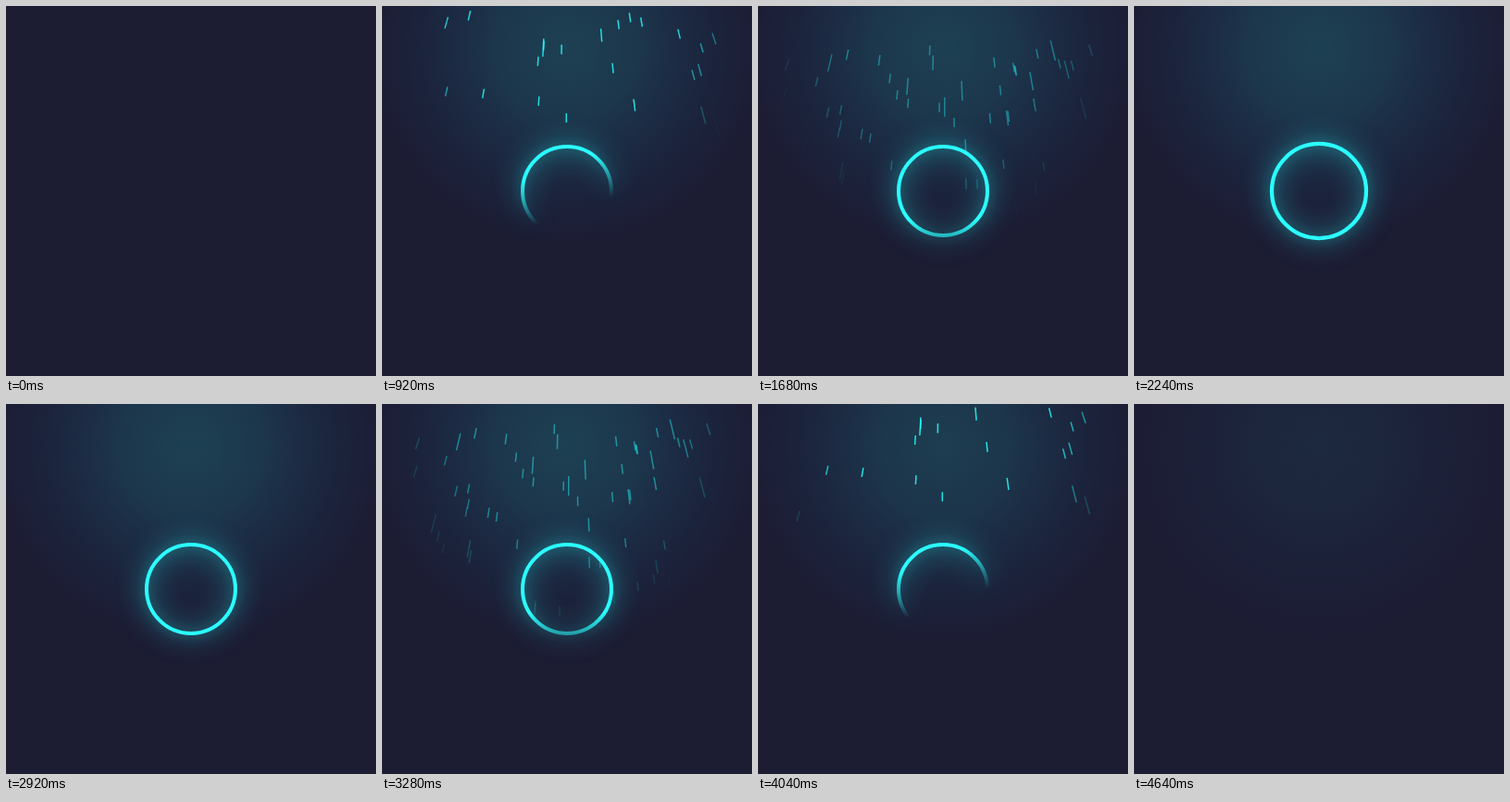
These frames come from a looping animation (400 px wide and 400 px high, 4800 ms). An HTML page with a canvas:

```html
<!DOCTYPE html>
<html>
<head>
<meta charset="utf-8">
<style>
html, body { margin: 0; width: 100%; height: 100%; overflow: hidden; background: #1c1c33; }
canvas { display: block; width: 100vmin; height: 100vmin; }
</style>
</head>
<body>
<canvas id="stage" width="400" height="400"></canvas>
<script>
const ctx = document.getElementById('stage').getContext('2d');
const LOOP = 4800, STEP = 40, TURN = 2440, START = 240;
const FALL = 0.26;        // px per ms
const APEX = -450;        // height where all rain lines meet
const DROPS = 78;

const clamp = v => Math.max(0, Math.min(1, v));
const ramp = (v, a, b) => clamp((v - a) / (b - a));
const cyan = alpha => `rgba(43,255,255,${alpha})`;

let seed = 7;
function random() {
  seed = (seed * 16807) % 2147483647;
  return seed / 2147483647;
}
for (let i = 0; i < 10; i++) random();

// Launches grow denser with time
const rain = Array.from({ length: DROPS }, () => ({
  lean: (random() - 0.5) * 0.66,
  launch: 300 + 1200 * random() ** 0.6,
  half: 5 + 7 * random() ** 4
}));

function drawGlow(level) {
  const g = ctx.createRadialGradient(200, 45, 0, 200, 45, 215);
  g.addColorStop(0, 'rgba(34,200,200,.21)');
  g.addColorStop(0.35, 'rgba(30,175,190,.185)');
  g.addColorStop(0.7, 'rgba(22,130,170,.09)');
  g.addColorStop(1, 'rgba(20,110,160,0)');
  ctx.globalAlpha = level;
  ctx.fillStyle = g;
  ctx.fillRect(0, 0, 400, 400);
}

function drawRain(u) {
  const level = 0.92 * Math.sqrt(1 - ramp(u, 700, 1900));
  ctx.strokeStyle = '#2ff';
  ctx.lineWidth = 1.5;
  for (const { lean, launch, half } of rain) {
    if (u < launch) continue;
    const y = FALL * (u - launch);
    const xAt = h => 200 + lean * (h - APEX);
    const far = Math.hypot((xAt(y) - 200) / 150, y / 190);
    ctx.globalAlpha = level * clamp((1.3 - far) * 2);
    ctx.beginPath();
    ctx.moveTo(xAt(y - half), y - half);
    ctx.lineTo(xAt(y + half), y + half);
    ctx.stroke();
  }
}

// A soft edge sweeps down the ring, tilted at first, then level
function drawRing(u) {
  const tilt = 0.35 * (1 - ramp(u, 920, 1280));
  const end = -50 + 150 * ramp(u, 280, 1960) ** 0.75;
  const begin = end - 50;
  const nx = Math.sin(tilt), ny = Math.cos(tilt);
  const g = ctx.createLinearGradient(nx * begin, ny * begin, nx * end, ny * end);
  g.addColorStop(0, cyan(1));
  g.addColorStop(1, cyan(0));
  const scale = 1 + 0.05 * (1 - Math.cos(Math.PI * ramp(u, 1960, TURN)));
  ctx.save();
  ctx.globalAlpha = 1;
  ctx.translate(200, 200);
  ctx.scale(scale, scale);
  ctx.filter = `drop-shadow(0 0 6px ${cyan(0.3)}) drop-shadow(0 0 14px ${cyan(0.8)})`;
  ctx.strokeStyle = g;
  ctx.lineWidth = 4;
  ctx.beginPath();
  ctx.arc(0, 0, 48, 0, Math.PI * 2);
  ctx.stroke();
  ctx.restore();
}

function draw(now) {
  const t = Math.floor((now % LOOP) / STEP) * STEP;
  ctx.globalAlpha = 1;
  ctx.fillStyle = '#1c1c33';
  ctx.fillRect(0, 0, 400, 400);
  if (t >= 280) {
    // The second half replays the first one backwards
    const forward = t <= TURN;
    const u = forward ? t : Math.max(START, 2 * TURN - t);
    const rest = forward ? 0 : 0.35;
    drawGlow(rest + (1 - rest) * ramp(u, START, 920));
    if (u > START) {
      drawRing(u);
      drawRain(u);
    }
  }
  requestAnimationFrame(draw);
}
requestAnimationFrame(draw);
</script>
</body>
</html>
```
